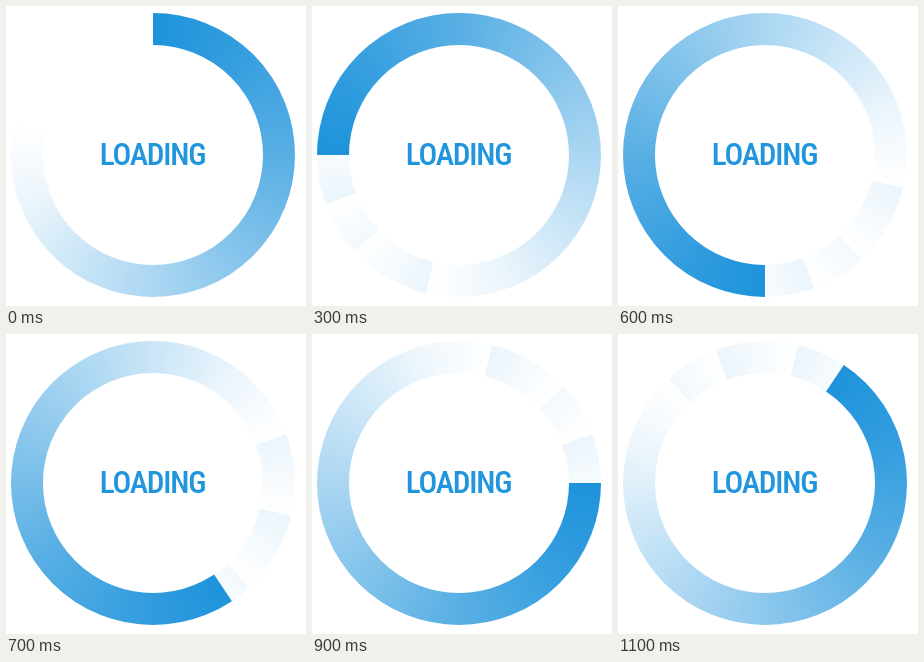
Recreate the animation shown at these times as an HTML page with a canvas. Size 300x300 px, loop 1.2 s.

```html
<!DOCTYPE html>
<html lang="en">
<head>
<meta charset="utf-8">
<title>Loading</title>
<style>
  html, body { margin: 0; width: 100%; height: 100%; overflow: hidden; background: #fff; }
  canvas, svg { position: absolute; left: 0; top: 0; display: block; }
  text {
    fill: #2196dc; text-anchor: middle;
    font-weight: 500; font-stretch: 62.5%; letter-spacing: -0.04em;
  }
</style>
</head>
<body>
<canvas id="ring" width="300" height="300"></canvas>
<svg width="300" height="300" viewBox="0 0 300 300">
  <text id="label" x="146.5" y="162">LOADING</text>
</svg>
<script>
const LOOP = 1200, STEPS = 12;
const SEGMENTS = 32, TAIL = 25.2;
const CENTER = { x: 147, y: 149 };
const RADIUS = 126, WIDTH = 32;
const BLUE = [30, 147, 219];
// Position along the tail (0 = head) and strength of the blue there.
const FADE = [[0, 1], [0.12, 0.92], [0.32, 0.74], [0.64, 0.37], [0.88, 0.09], [1, 0]];

const ctx = document.getElementById('ring').getContext('2d');
const label = document.getElementById('label');

const tint = strength =>
  `rgb(${BLUE.map(c => Math.round(255 + (c - 255) * strength)).join(',')})`;

function strokeArc(start, end, width, style) {
  ctx.lineWidth = width;
  ctx.strokeStyle = style;
  ctx.beginPath();
  ctx.arc(CENTER.x, CENTER.y, RADIUS, start, end);
  ctx.stroke();
}

function paintTail(step) {
  const unit = 2 * Math.PI / SEGMENTS;
  const turned = Math.round(step * SEGMENTS / STEPS);
  const head = -Math.PI / 2 - turned * unit;
  const gradient = ctx.createConicGradient(head, CENTER.x, CENTER.y);
  for (const [pos, strength] of FADE) {
    gradient.addColorStop(pos * TAIL / SEGMENTS, tint(strength));
  }
  // Keeps the antialiased head edge blue where the gradient wraps round.
  gradient.addColorStop(0.95, tint(1));
  strokeArc(head, head + TAIL * unit, WIDTH + 8, gradient);
}

// Each step paints over the last, so faint tail ends stay behind until the loop restarts.
function draw(time) {
  const current = Math.floor(time % LOOP / (LOOP / STEPS));
  ctx.globalCompositeOperation = 'source-over';
  ctx.clearRect(0, 0, 300, 300);
  for (let step = 0; step <= current; step++) paintTail(step);
  // Trims the oversized strokes to one clean ring.
  ctx.globalCompositeOperation = 'destination-in';
  strokeArc(0, 2 * Math.PI, WIDTH, '#000');
}

// Uses the narrowest available face at the largest size that fits.
function setLabel() {
  const families = ['Noto Sans', 'Open Sans', 'Roboto Condensed', 'Roboto'];
  const use = family => { label.style.fontFamily = `"${family}", sans-serif`; };
  label.style.fontSize = '100px';
  const faces = families.map(family => {
    use(family);
    return { family, em: label.getComputedTextLength() / 100 };
  });
  const face = faces.reduce((a, b) => (b.em < a.em ? b : a));
  const size = Math.min(39.2, 105.5 / face.em);
  use(face.family);
  label.style.fontSize = `${size}px`;
  label.setAttribute('y', 148 + size * 0.357);
}

function tick() {
  draw(performance.now());
  requestAnimationFrame(tick);
}

setLabel();
tick();
</script>
</body>
</html>
```
